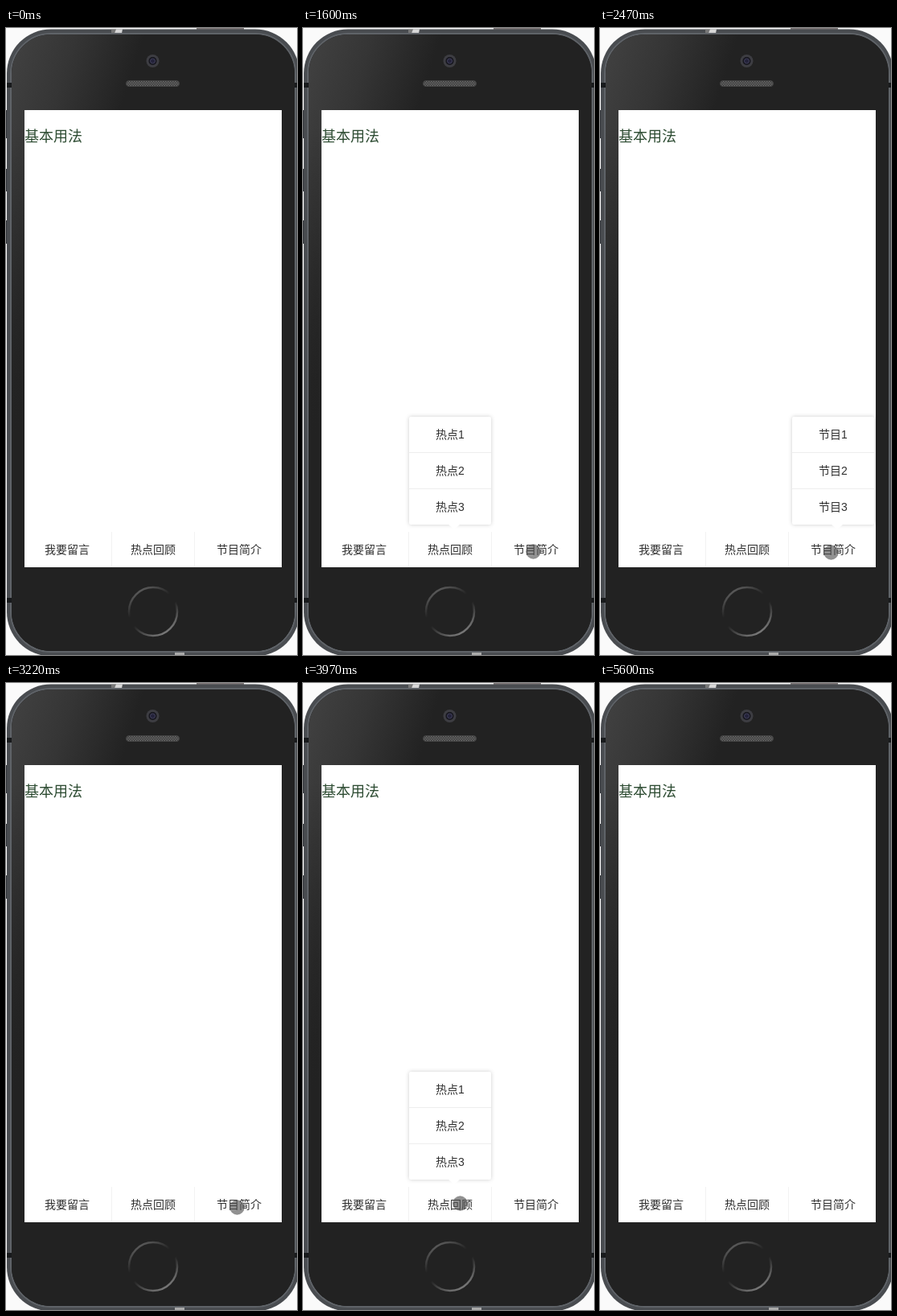
An HTML page for the animation above (5970 ms loop, 362 px wide and 779 px high).

```html
<!DOCTYPE html>
<html lang="zh-CN">
<head>
<meta charset="utf-8">
<style>
  html, body { margin: 0; width: 100%; height: 100%; overflow: hidden; background: #fafafa; }
  svg { display: block; }
  text { font: 14px "Liberation Sans", "Noto Sans CJK SC", "Noto Sans CJK", sans-serif; fill: #303030; text-anchor: middle; }
  .title { font-size: 18px; font-weight: 300; fill: #2b4a30; text-anchor: start; }
  .panel { fill: #fff; filter: drop-shadow(0 0 2.5px rgba(0, 0, 0, .2)); }
</style>
</head>
<body>
<svg width="362" height="779" viewBox="0 0 362 779">
  <defs>
    <linearGradient id="gloss" gradientUnits="userSpaceOnUse" x1="8" y1="20" x2="180" y2="74">
      <stop offset="0" stop-color="#414141"/>
      <stop offset=".4" stop-color="#353535"/>
      <stop offset=".85" stop-color="#222"/>
    </linearGradient>
    <linearGradient id="fade" x2="0" y2="1">
      <stop offset=".15" stop-color="#222" stop-opacity="0"/>
      <stop offset=".65" stop-color="#222"/>
    </linearGradient>
    <linearGradient id="ring" x1=".2" y1="0" x2=".8" y2="1">
      <stop offset="0" stop-color="#626262"/>
      <stop offset=".38" stop-color="#222"/>
      <stop offset=".55" stop-color="#222"/>
      <stop offset="1" stop-color="#858585"/>
    </linearGradient>
    <pattern id="mesh" width="3" height="3" patternUnits="userSpaceOnUse">
      <path d="M0 0h3v3h-3z" fill="#3a3a3a"/>
      <path d="M0 0h1.5v1.5h-1.5zM1.5 1.5h1.5v1.5h-1.5z" fill="#686868"/>
    </pattern>
  </defs>

  <!-- Phone shell -->
  <path d="M237 0h59v3h-59z" fill="#827b7b"/>
  <path d="M0 102h2v35h-2zM0 175h2v28h-2zM0 239h2v29h-2z" fill="#34373c"/>
  <rect x="1" y="1.5" width="364" height="779" rx="55" fill="#494c50"/>
  <path d="M131 1.5h14l-1 5h-10z" fill="#d6d6d6"/>
  <path d="M131 1.5h6l-2 5h-4z" fill="#777"/>
  <path d="M210 776h12v3h-12z" fill="#aaa"/>
  <rect x="6" y="7" width="354" height="768" rx="50" fill="#222" stroke="#5f6368" stroke-width="2"/>
  <rect x="7" y="8" width="352" height="766" rx="49" fill="url(#gloss)"/>
  <rect x="7" y="8" width="352" height="766" rx="49" fill="url(#fade)"/>
  <path d="M1 68h6v6h-6zM359 68h3v6h-3zM1 708h6v6h-6zM359 708h3v6h-3z" fill="#181a1c"/>

  <circle cx="182.5" cy="41" r="8" fill="#3d3d42"/>
  <circle cx="182.5" cy="41" r="5" fill="#15151d"/>
  <circle cx="182.5" cy="41" r="3" fill="#24233a" stroke="#41405a"/>
  <rect x="149.5" y="65.5" width="66" height="7" rx="3.5" fill="url(#mesh)" stroke="#444"/>
  <circle cx="183" cy="725" r="30" fill="none" stroke="url(#ring)" stroke-width="2.5"/>

  <!-- Screen -->
  <path d="M23 102h320v568h-320z" fill="#fff"/>
  <text class="title" x="23" y="141">基本用法</text>
  <path d="M131.5 626v44M234.5 626v44" stroke="#f2f2f2"/>
  <text x="76" y="653">我要留言</text>
  <text x="183" y="653">热点回顾</text>
  <text x="290" y="653">节目简介</text>
  <g id="popups"></g>
  <circle id="cursor" r="9" fill="#505050" fill-opacity=".63" stroke="#555" stroke-opacity=".25"/>
</svg>

<script>
const LOOP = 5970, TICK = 125;

// Pointer positions by tick; each holds until the next, null hides it.
const pointer = [
  [0, null], [4, [308, 753]], [5, [232, 662]], [6, [172, 613]], [7, [156.5, 641.5]], [8, [157, 646]],
  [11, [198, 648]], [12, [252, 650]], [13, [286.5, 650.5]], [15, [277, 651]], [16, [289, 651]],
  [18, [287.5, 651.5]], [27, [256, 650]], [28, [215, 648]], [29, [195.5, 646.5]],
  [41, [222, 668]], [42, [268, 710]], [43, [310, 753]], [44, [318, 769]], [45, null]
];

// Each pair is the tick where a popup starts to open and to close.
const popups = [
  { label: '热点', center: 183, spans: [[9, 18], [30, 39]] },
  { label: '节目', center: 290, spans: [[18, 24]] }
];

const layer = document.getElementById('popups');
const cursor = document.getElementById('cursor');

layer.innerHTML = popups.map(({ label, center }) => `
  <g transform="translate(${center} 483)">
    <rect class="panel" x="-51" width="102" height="134" rx="2"/>
    <path d="M-3 133h16l-8 7z" fill="#fff"/>
    <path d="M-51 44.5h102M-51 89.5h102" stroke="#eee"/>
    ${[1, 2, 3].map(n => `<text y="${45 * n - 18}">${label}${n}</text>`).join('')}
  </g>`).join('');

const clamp = v => Math.max(0, Math.min(1, v));

function opacityAt(spans, tick) {
  return Math.max(...spans.map(([open, close]) =>
    Math.min(clamp((tick - open + 1) / 3), clamp((close + 2 - tick) / 3))));
}

function draw(now) {
  const tick = Math.floor((now % LOOP + 30) / TICK);
  popups.forEach(({ spans }, i) => layer.children[i].setAttribute('opacity', opacityAt(spans, tick)));
  const position = pointer.filter(([start]) => start <= tick).pop()[1];
  cursor.style.display = position ? '' : 'none';
  if (position) cursor.setAttribute('transform', `translate(${position})`);
}

const start = performance.now();
function frame() {
  draw(performance.now() - start);
  requestAnimationFrame(frame);
}
frame();
</script>
</body>
</html>
```
